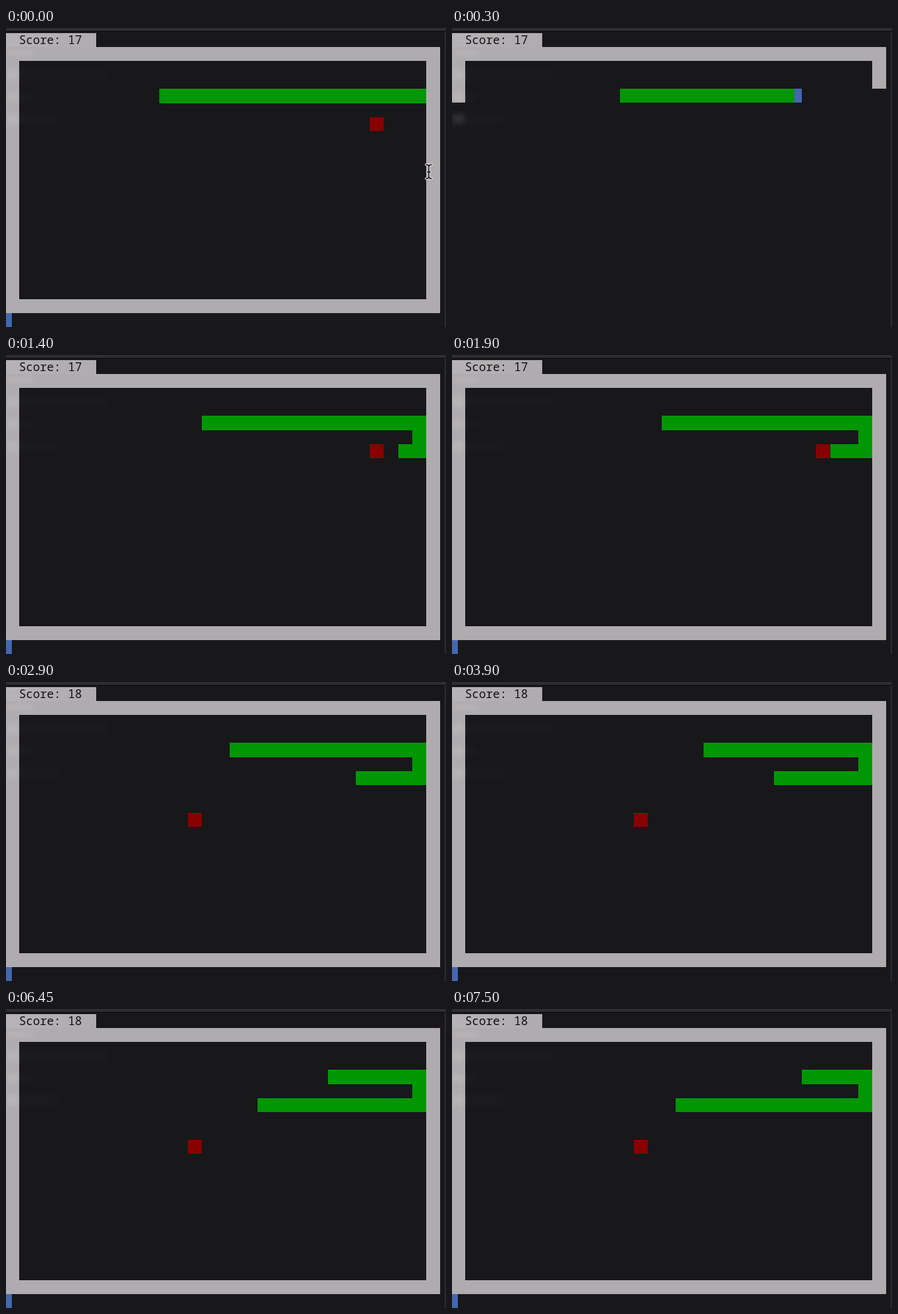
Recreate the animation shown at these times as an HTML page. Size 600x409 px, loop 8 s.

```html
<!DOCTYPE html>
<html lang="en">
<head>
<meta charset="utf-8">
<title>Snake in a terminal</title>
<style>
html, body { margin: 0; width: 100%; height: 100%; overflow: hidden; background: #18171a; }
svg { display: block; width: 600px; height: 409px; }
text { font: 500 15.9px "Noto Sans Mono", "DejaVu Sans Mono", monospace; white-space: pre; }
</style>
</head>
<body>
<svg viewBox="0 0 600 409">
  <defs>
    <linearGradient id="shine">
      <stop offset="0" stop-color="#b5b3b5"/>
      <stop offset="1" stop-color="#aeacae"/>
    </linearGradient>
    <filter id="soft" x="-20%" y="-50%" width="140%" height="200%"><feGaussianBlur stdDeviation="3"/></filter>
  </defs>
  <g shape-rendering="crispEdges">
    <path fill="#18171a" d="M0 0H600V409H0z"/>
    <path fill="#2e2d30" d="M0 0H600V4H0z"/>
    <path fill="#0d0c0e" d="M0 4H600V5H0z"/>
    <path fill="#2b2a2d" d="M598 5H600V409H598z"/>
    <path fill="url(#shine)" d="M0 7H123V27H0z"/>
    <path fill="#aeacae" fill-rule="evenodd" d="M0 26H592V390H0zM18 45V371H573V45z"/>
    <path id="snake" fill="#009604"/>
    <rect id="food" width="19" height="19" fill="#880000"/>
    <path id="blank" fill="#18171a" d="M0 102H598V409H0zM467 83H598V103H467z"/>
    <rect id="caret" height="19" fill="#4468b0"/>
  </g>
  <g fill="#fff" filter="url(#soft)">
    <path opacity=".1" d="M0 31H36V38H0zM0 57H17V71H0zM0 89H17V100H0zM0 118H17V131H0z"/>
    <path opacity=".012" d="M18 57H138V71H18zM18 89H34V100H18zM18 118H70V131H18z"/>
  </g>
  <text id="score" x="17.7" y="22" fill="#111"></text>
  <g id="pointer" fill="none" stroke-linecap="round">
    <path id="beam" stroke="#e4e2e4" stroke-width="3.6" d="M573 187Q576.5 187 576.5 190V203Q576.5 206 573 206M580 187Q576.5 187 576.5 190M580 206Q576.5 206 576.5 203M574.5 197H578.5"/>
    <use href="#beam" style="stroke:#111"/>
  </g>
</svg>
<script>
const $ = id => document.getElementById(id);
const LOOP = 8000;
const TICKS = [300, 850, 1400, 1900, 2400, 2900, 3400, 3900, 4450, 4950, 5450, 5950, 6450, 7000, 7500];
const LAST = 28;   // rightmost column of the board
const px = col => Math.round(18 + col * 19.138);
const py = row => Math.round(45 + row * 19.17);
const bar = (c0, c1, r0, r1) => `M${px(c0)} ${py(r0)}H${px(c1 + 1)}V${py(r1 + 1)}H${px(c0)}z`;
const set = (id, attrs) => {
  for (const key in attrs) $(id).setAttribute(key, attrs[key]);
};
const show = (id, on) => set(id, { visibility: on ? "visible" : "hidden" });

// The pointer is drawn as a light halo with a thin dark core.
const core = $("beam").cloneNode();
core.removeAttribute("id");
core.setAttribute("stroke", "#111");
core.setAttribute("stroke-width", "1.5");
$("pointer").querySelector("use").replaceWith(core);

function draw(t) {
  const n = TICKS.filter(tick => tick <= t).length;
  const eaten = n >= 6;
  const redraw = t >= 300 && t < 350;

  let d = bar(10 + n - eaten, LAST, 2, 2);
  if (n > 0) d += bar(LAST, LAST, 2, 3);
  if (n > 1) d += bar(LAST, LAST, 3, 4) + bar(30 - n, LAST, 4, 4);
  set("snake", { d });

  set("food", eaten ? { x: px(12), y: py(7) } : { x: px(25), y: py(4) });
  set("caret", redraw ? { x: 467, y: 83, width: 10 } : { x: 0, y: 390, width: 8 });
  show("blank", redraw);
  show("pointer", t < 150);
  $("score").textContent = "Score: " + (eaten ? 18 : 17);
}

const start = performance.now();
function frame() {
  draw((performance.now() - start) % LOOP);
  requestAnimationFrame(frame);
}
frame();
</script>
</body>
</html>
```
